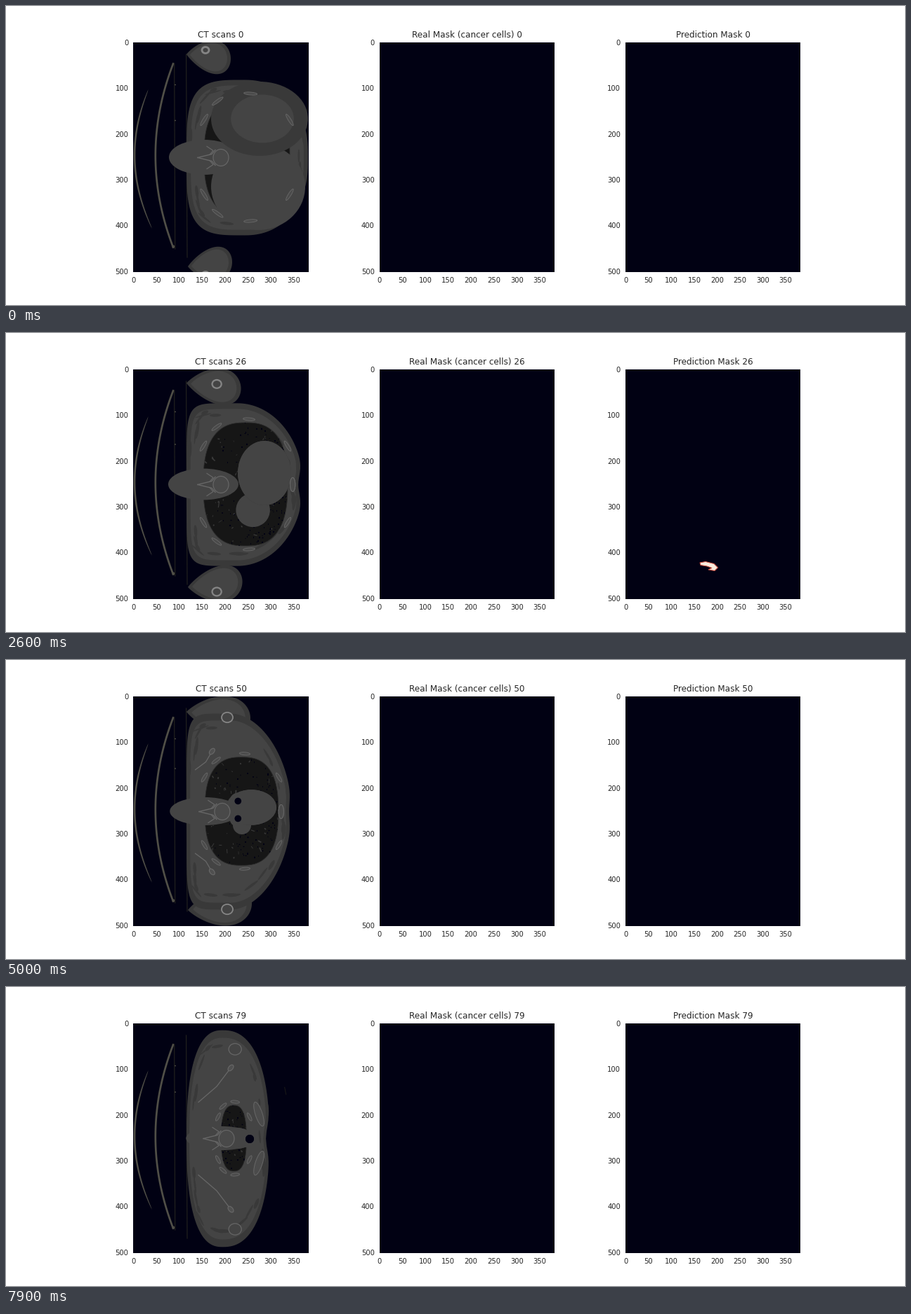
Animation, 1280 px wide and 427 px high, one loop 8 s. Source, as a matplotlib script:

```python
import numpy as np
import matplotlib.pyplot as plt
from matplotlib.animation import FuncAnimation
from matplotlib.collections import LineCollection
from matplotlib.lines import Line2D
from matplotlib.patches import Ellipse, Polygon, Rectangle

W, H, DPI = 1280, 427, 64
FRAMES, INTERVAL = 80, 100
PT = 72 / DPI  # points per pixel

INK, VOID, LUNG = "#262626", "#010113", "#161616"
FAT, SOFT, BONE, BRIGHT = "#393939", "#444444", "#676767", "#858585"
COUCH, FAINT = "#504f47", "#24241f"
BACK, MID = 257, 216.5  # flat back of the body and its line of symmetry
NAMES = ("CT scans", "Real Mask (cancer cells)", "Prediction Mask")
TURN = np.linspace(0, 2 * np.pi, 160, endpoint=False)


def ramp(i, start, end):
    return float(np.clip((i - start) / (end - start), 0, 1))


def track(i, *values):
    """Blend values from belly, heart, chest, shoulder and neck level."""
    return np.interp(i, (0, 26, 41, 60, 79), values)


def power(v, n):
    return np.sign(v) * np.abs(v) ** (2 / n)


def superellipse(x, y, rx, ry, n):
    """n and rx may vary along the curve."""
    return np.c_[x + rx * power(np.cos(TURN), n), y + ry * power(np.sin(TURN), n)]


def shrink(points, k):
    mid = (points.min(axis=0) + points.max(axis=0)) / 2
    return mid + (points - mid) * k


fig = plt.figure(figsize=(W / DPI, H / DPI), dpi=DPI, facecolor="white")
plt.rcParams["font.family"] = "DejaVu Sans"


def make_panel(left):
    top, bottom, width = 51.7, 379.6, 249.4
    ax = fig.add_axes([left / W, 1 - bottom / H, width / W, (bottom - top) / H], facecolor=VOID)
    ax.set(xlim=(-0.5, 382.5), ylim=(501.5, -0.5),
           xticks=range(0, 351, 50), yticks=range(0, 501, 100))
    ax.tick_params(length=0, pad=7 * PT, labelsize=10 * PT, labelcolor=INK)
    for spine in ax.spines.values():
        spine.set_visible(False)
    return ax.set_title("", fontsize=12 * PT, color=INK, pad=7 * PT)


titles = [make_panel(181.3 + 350.3 * k) for k in range(3)]

# Pixel-sized overlay that carries all shapes.
stage = fig.add_axes([0, 0, 1, 1])
stage.set(xlim=(0, W), ylim=(H, 0))
stage.axis("off")
scan = stage.add_patch(Rectangle((181.3, 51.7), 249.4, 327.9, fill=False, lw=0))
drawn = []


def add(artist, clip=scan):
    stage.add_artist(artist)
    artist.set_clip_path(scan)
    artist.set_clip_path(clip)
    artist.set_zorder(10 + len(drawn))
    drawn.append(artist)
    return artist


def shape(points, color, edge="none", lw=0.0, clip=scan):
    return add(Polygon(points, facecolor=color, edgecolor=edge, lw=lw * PT), clip)


def oval(x, y, rx, ry, color="none", edge="none", lw=0.0, turn=0.0, clip=scan):
    add(Ellipse((x, y), 2 * rx, 2 * ry, angle=turn,
                facecolor=color, edgecolor=edge, lw=lw * PT), clip)


def stroke(xs, ys, color, lw):
    add(Line2D(xs, ys, color=color, lw=lw * PT))


def segments(start, end, color, widths, clip):
    add(LineCollection(np.stack([start, end], 1), colors=color, linewidths=widths * PT), clip)


def draw_couch(i):
    y = np.linspace(119, 318, 60)
    x = 181.8 + 0.00235 * (y - 213) ** 2
    thick = 2.6 * np.sqrt(np.clip(1 - ((y - 218.5) / 99.5) ** 2, 0, 1))
    shape(np.r_[np.c_[x, y], np.c_[x + thick, y][::-1]], COUCH)
    y = np.linspace(82.5, 344.5, 60)
    stroke(212.8 + 25.2 * ((y - 213.5) / 131) ** 2, y, COUCH, 2.7)
    oval(238.3, 343.5, 2, 2, COUCH)
    stroke([239.7, 240.7], [82, 347], FAINT, 1.1)
    for y in (112.5, 163.5 - 0.17 * i):
        oval(241, y, 1, 0.8, COUCH)
    stroke([256.6, 258], [69, 359], FAINT, 1.1)
    if i >= 64:
        x, y = 412 - 1.3 * (i - 68), 222 - 6.7 * (i - 68)
        stroke([x - 1, x + 1], [y - 5, y + 5], "#1a1a18", 1)


def draw_arms(i):
    """Teardrops with the tip on the couch, until the shoulders absorb them."""
    if i >= 60:
        return
    length, depth = 31.5 + 0.28 * i, 30 + 0.1 * i
    x = BACK + length * (1 - np.cos(TURN))
    y = 69 + 0.1 * i + 0.1 * (x - BACK) + depth * np.sin(TURN) * np.sin(TURN / 2) ** 0.8
    low = 431 - y + max(0, 10 - 0.25 * i)
    for arm in (np.c_[x, y], np.c_[x + 2, low]):
        shape(arm, FAT)
        shape(shrink(arm, 0.84), SOFT)


def front_of(i):
    return 431 - 0.1 * i - 0.0077 * i ** 2


def draw_body(i):
    wide = 340 - 0.4 * i
    height = 111 + 0.2 * i + 40 * ramp(i, 41, 60) - 12 * ramp(i, 60, 79)
    ahead = np.cos(TURN) > 0
    rx = np.where(ahead, front_of(i) - wide, wide - BACK)
    n = np.where(ahead, track(i, 2.2, 2, 2.1, 1.65, 2.4), track(i, 3.8, 6.5, 8, 5, 2.5))
    body = superellipse(wide, MID, rx, height, n)
    dent = track(i, 1, 7, 6, 1, 5) * np.exp(-((body[:, 1] - MID) / 22) ** 2)
    body[:, 0] -= np.where(ahead, dent, 0)
    shape(body, FAT)
    shape(shrink(body, 0.93), SOFT)

    # Fat streaks between the muscles follow the outline.
    rng = np.random.default_rng(5)
    ring = shrink(body, 0.86)
    slope = np.roll(ring, -1, axis=0) - ring
    for j in rng.choice(len(ring), 26, replace=False):
        x, y = ring[j] + rng.normal(0, 3, 2)
        angle = np.degrees(np.arctan2(slope[j, 1], slope[j, 0]))
        oval(x, y, rng.uniform(5, 13), rng.uniform(1, 2.6), FAT, turn=angle)


def cavity(i):
    return (343 - 0.003 * i ** 2, MID - 0.5,
            track(i, 61, 60, 57, 47, 18), track(i, 86, 88, 82, 72, 47))


def draw_lungs(i):
    x, y, rx, ry = cavity(i)
    lungs = shape(superellipse(x, y, rx, ry, 2.6), LUNG, "#2b2b2b", 0.8)
    rng = np.random.default_rng(100 + i)
    size = rx * ry / 5200

    # Air-filled specks crowd towards the front.
    n = int(size * track(i, 10, 260, 170, 170, 420))
    u = rng.random((n, 2))
    u[:, 0] **= track(i, 0.4, 0.4, 0.4, 0.5, 1)
    spots = (x, y) + (2 * u - 1) * (rx, ry)
    segments(spots, spots + rng.uniform(0.6, 2.2, (n, 1)) * (1, 0), VOID,
             rng.uniform(1, 2.4, n), lungs)

    # Vessels point away from the root of the lungs.
    n = int(80 * size * ramp(i, -5, 14))
    start = (x, y) + rng.uniform(-1, 1, (n, 2)) * (rx, ry)
    away = start - (322, MID)
    away /= np.linalg.norm(away, axis=1, keepdims=True) + 1e-6
    end = start + (away + rng.normal(0, 0.5, (n, 2))) * rng.uniform(1, 5, (n, 1))
    segments(start, end, FAT, rng.uniform(0.6, 1.9, n), lungs)


def draw_organs(i):
    x, y, rx, _ = cavity(i)
    oval(x - rx, y, 50, 25 - 0.1 * i, SOFT)  # tissue around the spine

    # Two domes fill the belly and sink to the liver tip and the heart.
    full = 1 - ramp(i, 0, 17)
    sink = ramp(i, 17, 41)
    size = (31 - 18 * sink) * (1 - ramp(i, 60, 79))
    oval(361 - 25 * sink - 2 * full, 263 - 27 * sink - 5 * full,
         size + 36 * full, size + 31 * full, SOFT)
    x = track(i, 372, 368, 355, 343, 328) - 11 * full
    y = track(i, 188, 200, 210, 211, 216) - 27 * full
    rx = track(i, 32, 38, 40, 31, 24) + 37 * full
    ry = track(i, 43, 46, 31, 19, 15) + 10 * full
    oval(x, y, rx, ry, FAT)
    inner = 1 - 0.35 * full
    oval(x + 4 * full, y, rx * inner, ry * inner, SOFT)

    # Bronchi join into the windpipe.
    if i > 36:
        join = ramp(i, 41, 58)
        x = 325 + 10 * join + 12 * ramp(i, 60, 79)
        r = 3.5 * ramp(i, 36, 41) + 2.5 * join
        ways = (184 + 33 * join, 237 - 20 * join)
        for way in ways:
            oval(x, way, r + 7, r + 7, SOFT)
        for way in ways:
            oval(x, way, r, r, VOID)


def draw_ribs(i):
    x, y, rx, ry = cavity(i)
    for angle in np.radians([30, 88, 122, 150]):
        for side in (-1, 1):
            dx, dy = (rx + 7) * power(np.cos(angle), 2.6), (ry + 5) * power(np.sin(angle), 2.6)
            turn = np.degrees(np.arctan2(side * dy / ry, dx / rx)) + 90
            oval(x + dx, y + side * dy, 9.5 - 0.04 * i, 2, "#4b4b4b", BONE, 0.9, turn)


def draw_spine(i):
    x = 306 + 8 * ramp(i, 41, 79)
    oval(x, MID, 11, 12, "#494949", BONE, 1.2)
    for s in (-1, 1):
        stroke([x - 33, x - 13, x - 8], [MID, MID + 5 * s, MID + 11 * s], BONE, 1.4)
        stroke([x - 20, x - 11, x - 16], [MID + 16 * s, MID + 10 * s, MID + 4 * s], BONE, 1.2)


def draw_shoulders(i):
    if i >= 30:  # shoulder blades
        grow = ramp(i, 30, 75)
        x0, x1 = 266 + 8 * grow, 272 + 48 * grow
        near, far = 66 - 14 * grow, 74 + 27 * grow
        for s in (-1, 1):
            ys = MID + s * np.array([near, (near + far) / 2 - 2, far])
            stroke([x0, (x0 + x1) / 2 + 3, x1], ys, BONE, 1.3)
            oval(x1, ys[-1], 5, 3, "#505050", BONE, 1.2, 50 * s)

    # The breastbone parts into the collarbones.
    if i >= 8:
        part = ramp(i, 58, 79)
        for s in (-1, 1):
            oval(front_of(i) - 15, MID + 35 * part * s, 3.6 + 1.4 * part, 10 + 8 * part,
                 "#4b4b4b", BONE, 1, 18 * part * s)

    # Upper arm bones drift inwards.
    step = min(i, 68)
    x, r = 284 + 0.62 * step, 5 + 0.06 * step
    tone = BRIGHT if i < 72 else BONE
    for y in (63 + 0.38 * step, 384 - 0.56 * step):
        oval(x, y, r, 0.9 * r, SOFT, tone, 2.8 - 0.02 * i)


def draw_prediction(i):
    if 39 <= i <= 41:
        for x, r in ((1004.5, 1.6), (999, 0.7)):
            oval(x, 326.5, r, r, "#d4604d", clip=stage.patch)
    elif 23 <= i < 39:
        k = min(ramp(i, 21, 26), 1 - 0.75 * ramp(i, 28, 39))
        hook = np.array([(988, 328), (996, 326.5), (1008, 329.5), (1013.5, 335), (1009, 339.5),
                         (1000, 338), (1005, 335.5), (998, 333), (989, 331.5)])
        root = (1004, 328)
        shape(root + (hook - root) * k, "#faebdd", "#d0503f", 1, clip=stage.patch)


PARTS = (draw_couch, draw_arms, draw_body, draw_lungs, draw_organs,
         draw_ribs, draw_spine, draw_shoulders, draw_prediction)


def update(i):
    while drawn:
        drawn.pop().remove()
    for title, name in zip(titles, NAMES):
        title.set_text(f"{name} {i}")
    for draw in PARTS:
        draw(i)
    return titles


animation = FuncAnimation(fig, update, frames=FRAMES, interval=INTERVAL,
                          repeat=True, repeat_delay=0, blit=False)
plt.show()
```
